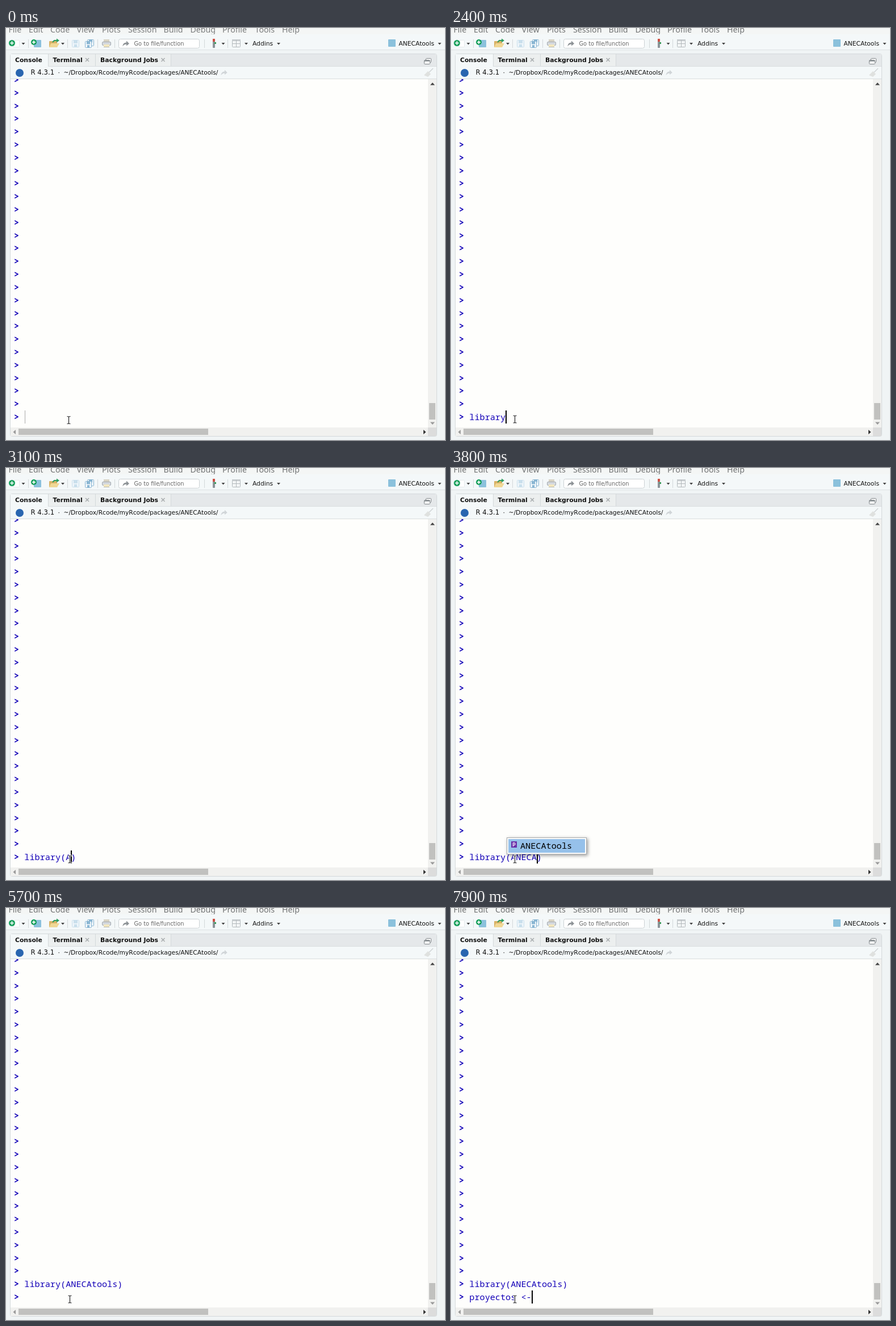
Write an HTML page with a canvas that moves like this. It is 773 px wide and 725 px high and loops after 8000 ms.

```html
<!DOCTYPE html>
<html lang="en">
<head>
<meta charset="utf-8">
<title>R console</title>
<style>
html, body { margin: 0; width: 100%; height: 100%; overflow: hidden; background: #f2f6f7; }
canvas { display: block; }
</style>
</head>
<body>
<canvas id="stage" width="773" height="725"></canvas>
<script>
const ctx = document.getElementById('stage').getContext('2d');
const LOOP = 8000;
const SANS = '"DejaVu Sans", sans-serif';
const UI = '10.7px ' + SANS;
const BOLD = 'bold 10.8px ' + SANS;
const MENU = '14.2px "Noto Sans", "Open Sans", sans-serif';
const MONO = '15.2px "Noto Sans Mono", "DejaVu Sans Mono", monospace';
const CELL = 9.12, LINE = 22.81, BASE = 690, LEFT = 32.3;
const INK = '#1400b8';

// Typed text by time: [ms, text before caret, text after caret, caret shown]
const CALL = 'library(ANECAtools)', NAME = 'proyectos <-';
const typing = [[0, '', '', 1], [1300, '', '', 0]];
const type = (word, tail, steps) =>
  steps.forEach(([ms, n]) => typing.push([ms, word.slice(0, n), tail, 1]));
type(CALL, '', [[1500, 1], [1700, 2], [2000, 4], [2100, 5], [2300, 6], [2400, 7]]);
type(CALL, ')', [[3000, 8], [3100, 9], [3300, 10], [3400, 11], [3700, 12], [3800, 13], [4400, 18]]);
type(NAME, '', [[5000, 0]]);
typing.push([5700, '', '', 0]);
type(NAME, '', [[5800, 1], [5900, 2], [6000, 3], [6200, 4], [6300, 5], [6700, 7],
  [6900, 8], [7000, 9], [7100, 10]]);
typing.push([7700, NAME.slice(0, 10), '', 0]);
type(NAME, '', [[7800, 11], [7900, 12]]);

function rect(x, y, w, h, color) {
  ctx.fillStyle = color;
  ctx.fillRect(x, y, w, h);
}

function round(x, y, w, h, r, fill, line) {
  ctx.beginPath();
  ctx.roundRect(x, y, w, h, r);
  if (fill) { ctx.fillStyle = fill; ctx.fill(); }
  if (line) { ctx.strokeStyle = line; ctx.lineWidth = 1; ctx.stroke(); }
}

function dot(x, y, r, color) {
  ctx.fillStyle = color;
  ctx.beginPath();
  ctx.arc(x, y, r, 0, 7);
  ctx.fill();
}

function poly(color, ...p) {
  ctx.fillStyle = color;
  ctx.beginPath();
  for (let i = 0; i < p.length; i += 2) ctx.lineTo(p[i], p[i + 1]);
  ctx.fill();
}

function stroke(color, width, ...p) {
  ctx.strokeStyle = color;
  ctx.lineWidth = width;
  ctx.beginPath();
  for (let i = 0; i < p.length; i += 2) ctx.lineTo(p[i], p[i + 1]);
  ctx.stroke();
}

function text(str, x, y, font, color) {
  ctx.font = font;
  ctx.fillStyle = color;
  ctx.fillText(str, x, y);
}

const drop = x => poly('#444', x - 3, 26, x + 3, 26, x, 29.5);
const divider = x => rect(x, 20, 1, 15, '#d3d8da');

function plus(x, y, r) {
  dot(x, y, r, '#12a05c');
  rect(x - r * .6, y - .8, r * 1.2, 1.6, '#fff');
  rect(x - .8, y - r * .6, 1.6, r * 1.2, '#fff');
}

function bentArrow(x, y, s, color) {
  ctx.save();
  ctx.translate(x, y);
  ctx.scale(s, s);
  ctx.fillStyle = color;
  ctx.beginPath();
  ctx.moveTo(-6, 5);
  ctx.quadraticCurveTo(-5, -2, 1, -2);
  ctx.lineTo(1, -5);
  ctx.lineTo(6, 0);
  ctx.lineTo(1, 4);
  ctx.lineTo(1, 1);
  ctx.quadraticCurveTo(-3, 1, -6, 5);
  ctx.fill();
  ctx.restore();
}

function disk(x, y, s, color) {
  round(x + .5, y + .5, s, s, 1, '#eef5fa', color);
  rect(x + 3, y + 1, s - 5, s * .4, color);
  rect(x + 4, y + s * .65, s - 7, s * .35, color);
}

function toolbar(focused) {
  const menu = { File: 4.5, Edit: 40, Code: 78, View: 124.5, Plots: 169, Session: 215,
    Build: 277.5, Debug: 324.5, Profile: 381, Tools: 438.5, Help: 486 };
  rect(0, 0, 773, 11, '#f4f6f5');
  for (const k in menu) text(k, menu[k], 8, MENU, focused ? '#707273' : '#7a7c7d');
  rect(0, 11, 773, 27, '#f4f8f9');
  rect(0, 38, 773, 1, '#dce1e3');

  round(13.5, 21.5, 10, 12, 1, '#fff', '#e6eaec');
  plus(10.5, 26.5, 5.5);
  drop(30.5);
  divider(39);

  round(49, 21, 13, 13, 1, '#8bc1dc');
  plus(49, 25, 5);

  round(76, 23, 14, 11, 1, '#d9b266');
  poly('#f0d795', 79, 27, 94, 27, 90, 34, 76, 34);
  stroke('#2f9e62', 2, 82, 25, 85, 22, 90, 22);
  poly('#2f9e62', 89, 18.5, 94, 22, 89, 25.5);
  drop(100);
  divider(108);

  disk(116, 21, 12, '#c9dfec');
  disk(143, 20, 11, '#8ab6d3');
  disk(139, 23, 11, '#8ab6d3');
  divider(161);

  rect(172, 20, 10, 5, '#d8d3c4');
  round(169.5, 24.5, 15, 6, 1.5, '#d5d9de', '#a3a9b0');
  rect(172, 29, 10, 5, '#f3e7bf');
  stroke('#b4b5b0', 1, 172, 33.5, 182, 33.5);
  divider(191);

  round(198.5, 19.5, 142, 16, 3, '#fff', '#cbd0d3');
  bentArrow(211, 27.5, 1, '#8d9296');
  text('Go to file/function', 225.5, 31, '9.8px ' + SANS, '#666');
  divider(349);

  round(364, 23, 4, 12, 1, '#8c9499');
  rect(364, 19, 4, 5, '#cf4f43');
  rect(367, 25, 3, 3, '#3b9a5a');
  drop(382.5);
  divider(390);

  round(398.5, 20.5, 14, 13, 1, '#f3f5f6', '#b4babd');
  rect(398, 20, 15, 3, '#c6cbce');
  rect(405, 21, 1, 12, '#b4babd');
  rect(399, 27, 14, 1, '#b4babd');
  drop(423);
  text('Addins', 434, 31, UI, '#111');
  drop(480);

  round(673, 20, 13, 13, 1, '#8bc1dc');
  text('ANECAtools', 691.5, 31, UI, '#111');
  drop(763.5);
}

function closeMark(x) {
  stroke('#a9adaf', 1.6, x - 3, 53, x + 3, 59);
  stroke('#a9adaf', 1.6, x + 3, 53, x - 3, 59);
}

function pane() {
  round(7.5, 45.5, 751, 673, 3, '#f4f8f9', '#d4d9db');
  rect(8, 46, 750, 21, '#e5e8ea');
  rect(8, 67, 750, 1, '#d9dddf');
  rect(8, 46, 66, 22, '#f4f8f9');
  rect(74, 46, 83, 21, '#ecefef');
  rect(157, 46, 133, 21, '#ecefef');
  for (const x of [74, 157, 290]) rect(x, 46, 1, 21, '#d4d9db');
  text('Console', 16, 60, BOLD, '#111');
  text('Terminal', 82.5, 60, BOLD, '#111');
  text('Background Jobs', 166, 60, BOLD, '#111');
  closeMark(143);
  closeMark(276.5);

  round(739.5, 53.5, 9, 7, 1, '#fff', '#7d8386');
  round(736.5, 56.5, 10, 7, 1, '#fff', '#7d8386');
  rect(737, 57, 10, 2, '#9aa0a3');

  dot(24, 79, 7, '#2a66b0');
  text('R 4.3.1', 43.5, 82, '11.7px ' + SANS, '#111');
  text('·', 91.5, 82, UI, '#111');
  text('~/Dropbox/Rcode/myRcode/packages/ANECAtools/', 101.5, 82, UI, '#111');
  bentArrow(384, 78.5, .95, '#d0d5d8');
  stroke('#cfd3d5', 1.5, 752, 71, 745, 78);
  poly('#dfe1df', 743, 76, 748, 81, 743, 86, 736, 83);
  rect(8, 89, 750, 1, '#d9dddf');
  rect(8, 90, 735, 613, '#fefefc');
}

function scrollbars(moved) {
  rect(743, 90, 15, 613, '#f1f1ef');
  rect(745, moved ? 658 : 660, 11, 29, '#c1c1bf');
  poly('#444', 747, 100.5, 755, 100.5, 751, 96);
  poly(moved ? '#444' : '#9a9a9a', 747, 693.5, 755, 693.5, 751, 698);
  rect(8, 703, 735, 15, '#f1f1ef');
  rect(22, 705, 334, 11, '#c1c1bf');
  poly('#9a9a9a', 17, 707, 17, 715, 12.5, 711);
  poly('#333', 735, 707, 735, 715, 739.5, 711);
  rect(743, 703, 15, 15, '#dcdcdc');
}

function box(x, y, w, h) {
  ctx.save();
  ctx.shadowColor = 'rgba(0,0,0,.4)';
  ctx.shadowBlur = 6;
  ctx.shadowOffsetX = 2;
  ctx.shadowOffsetY = 2;
  rect(x, y, w, h, '#fdfdfb');
  ctx.restore();
  ctx.strokeStyle = '#a9abad';
  ctx.lineWidth = 1;
  ctx.strokeRect(x + .5, y + .5, w - 1, h - 1);
}

function functionList() {
  box(25, 597, 350, 83);
  rect(27, 599, 344, 24, '#96c1ea');
  [['library', '{base}'], ['library.dynam', '{ANECAtools}'],
    ['library.dynam.unload', '{ANECAtools}']].forEach(([name, pkg], i) => {
    const y = 616 + i * 26.8;
    poly(i ? '#5f9fc2' : '#5fb0b4', 32, y - 5.5, 38, y - 12, 43, y - 8, 37, y - 2);
    stroke('#4788a2', .7, 32, y - 5.5, 37, y - 2, 43, y - 8);
    text(name, 49, y, MONO, '#000');
    text(pkg, 361 - pkg.length * CELL, y, MONO, i ? '#999' : '#7f93a5');
  });
}

function packageList() {
  box(98, 650, 141, 30);
  rect(101, 653, 135, 24, '#96c1ea');
  rect(106, 657, 10, 11, '#6b2fa8');
  text('P', 108, 666, 'bold 8px ' + SANS, '#eadcf5');
  text('ANECAtools', 122, 669.5, MONO, '#000');
}

function pointer(x, y) {
  const beam = (color, w) => {
    stroke(color, w, x, y - 6, x, y + 6);
    for (const s of [-1, 1]) stroke(color, w, x - 3, y + s * 6.5, x, y + s * 6, x + 3, y + s * 6.5);
  };
  beam('#fff', 3);
  beam('#222', 1.2);
}

function consoleText(t) {
  const [, head, tail, shown] = typing.filter(s => s[0] <= t).pop();
  const entered = t >= 4900, waiting = entered && t < 5000;
  const shift = waiting ? 8 : 0;
  const font = '500 ' + MONO;
  ctx.save();
  ctx.beginPath();
  ctx.rect(8, 90, 735, 613);
  ctx.clip();
  for (let k = 0; k < 27; k++)
    text('>', 14, Math.round(BASE - shift - k * LINE), 'bold ' + MONO, INK);
  if (entered) text(CALL, LEFT, Math.round(BASE - shift - (waiting ? 0 : LINE)), font, INK);
  if (waiting) {
    rect(14, 688, 2, 15, '#000');
  } else {
    text(head + tail, LEFT, BASE, font, INK);
    const x = Math.round(LEFT + head.length * CELL);
    if (t < 600) rect(x + 1, 673, 1, 23, '#aaa');
    else if (shown) rect(x, 673, 2, 23, '#000');
  }
  ctx.restore();
}

function draw(t) {
  rect(0, 0, 773, 725, '#f0f4f5');
  toolbar(t >= 600);
  pane();
  consoleText(t);
  scrollbars(t >= 4900 && t < 5000);
  if (t >= 2700 && t < 2900) functionList();
  if (t >= 3800 && t < 4400) packageList();
  if (t < 1300) pointer(110.5, 690);
  else pointer(112.5, 688.5);
}

const start = performance.now();
function tick() {
  draw((performance.now() - start) % LOOP);
  requestAnimationFrame(tick);
}
tick();
</script>
</body>
</html>
```
